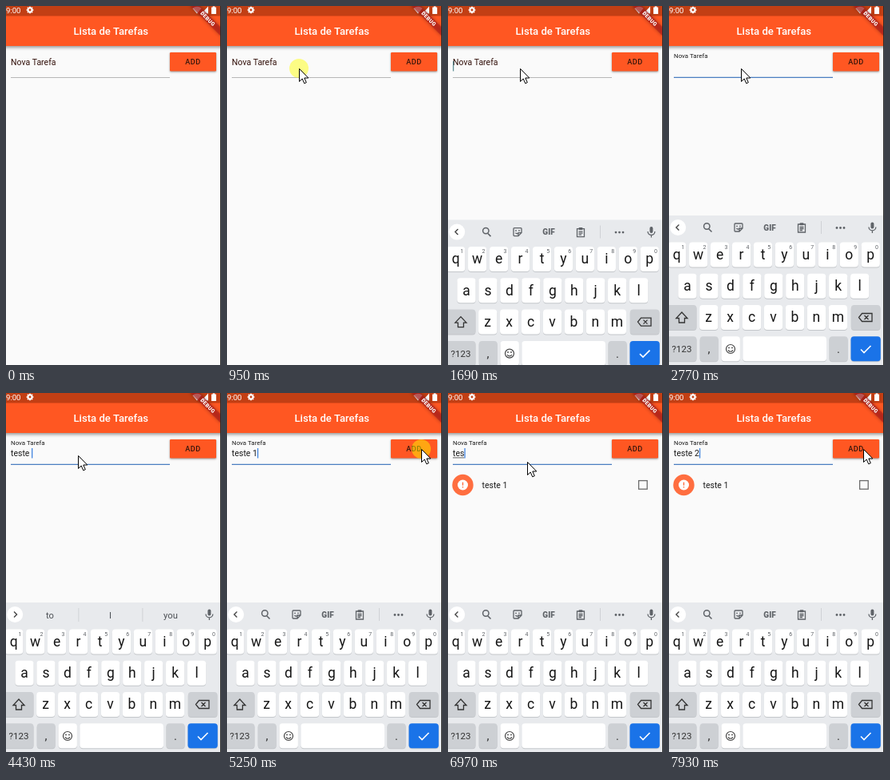
These frames come from a looping animation (269 px wide and 449 px high, 8000 ms). An HTML page with a canvas:

```html
<!DOCTYPE html>
<html lang="pt">
<head>
<meta charset="utf-8">
<title>Lista de Tarefas</title>
<style>
html, body { margin: 0; width: 100%; height: 100%; overflow: hidden; background: #fafafa; }
canvas { display: block; width: 269px; height: 449px; }
</style>
</head>
<body>
<canvas id="stage"></canvas>
<script>
const W = 269, H = 449, LOOP = 8000, STEP = 70;
const stage = document.getElementById('stage');
const ratio = window.devicePixelRatio || 1;
stage.width = W * ratio;
stage.height = H * ratio;
const c = stage.getContext('2d');

const ORANGE = '#ff5722', GREY = '#5f6368', INK = '#1c1c1c', BLUE = '#4a7dc0';

// ---------- drawing helpers ----------
function box(x, y, w, h, color, r = 0) {
  c.fillStyle = color;
  c.beginPath();
  c.roundRect(x, y, w, h, r);
  c.fill();
}
function disc(x, y, r, color) {
  c.fillStyle = color;
  c.beginPath();
  c.arc(x, y, r, 0, 7);
  c.fill();
}
function line(path, color = GREY, width = 1.3) {
  c.strokeStyle = color;
  c.lineWidth = width;
  c.stroke(new Path2D(path));
}
function shape(path, color) {
  c.fillStyle = color;
  c.fill(new Path2D(path));
}
function font(size, weight = 400) {
  c.font = `${weight} ${size}px Roboto, sans-serif`;
}
function text(str, x, y, size, color = INK, align = 'left', weight = 400, spacing = 0) {
  font(size, weight);
  c.letterSpacing = spacing + 'px';
  c.textAlign = align;
  c.fillStyle = color;
  c.fillText(str, x, y);
  c.letterSpacing = '0px';
}
function at(x, y, draw) {
  c.save();
  c.translate(x, y);
  draw();
  c.restore();
}
function withShadow(color, blur, dy, draw) {
  c.save();
  c.shadowColor = color;
  c.shadowBlur = blur * ratio;
  c.shadowOffsetY = dy * ratio;
  draw();
  c.restore();
}

// ---------- timing helpers ----------
const clamp = v => Math.max(0, Math.min(1, v));
const span = (t, from, to) => clamp((t - from) / (to - from));
const ease = p => p * p * (3 - 2 * p);
const mix = (a, b, p) => a + (b - a) * p;
const latest = (list, t) => list.filter(e => e[0] <= t).pop()[1];
const within = (t, ranges) => ranges.some(([a, b]) => t >= a && t < b);

// Motion is held for 70 ms at a time, counted from the start of each burst.
const bursts = [0, 390, 1480, 3020, 4830, 5660, 7300];
function hold(t) {
  const start = bursts.filter(b => b <= t).pop();
  return start + Math.floor((t - start) / STEP) * STEP;
}

const typed = [
  [0, ''], [3020, 't'], [3220, 'te'], [3550, 'tes'], [3620, 'test'], [4100, 'teste'],
  [4170, 'teste '], [4630, 'teste 1'], [5390, ''], [6490, 't'], [6620, 'te'],
  [6970, 'tes'], [7040, 'test'], [7300, 'teste'], [7370, 'teste '], [7580, 'teste 2']
];
const GUESS = ['teste', 'test', 'tests'], NEXT = ['to', 'I', 'you'];
const suggestions = [
  [0, null], [3280, ['te', 'the', 'to']], [3620, GUESS], [4430, NEXT], [4830, null],
  [7040, GUESS], [7510, NEXT], [7720, null]
];
const caretOff = [[0, 1480], [1970, 2370], [2770, 3020], [6220, 6420]];
const clicks = [[950, 1150], [5250, 5390]];

// ---------- app ----------
function statusBar() {
  box(0, 0, W, 12.5, '#c23f14');
  text('9:00', 0, 9, 9.6, '#fff');
  at(30, 5, () => {
    for (let i = 0; i < 4; i++) {
      c.rotate(Math.PI / 4);
      box(-1.1, -4.3, 2.2, 8.6, '#fff', 0.4);
    }
    disc(0, 0, 3.3, '#fff');
    disc(0, 0, 1.4, '#c23f14');
  });
  shape('M233.5 3Q239 -1.5 244.500 3L239 9.500Z', '#fff');
  shape('M253 0.500V9.500H244.500Z', '#fff');
  box(257, 1.5, 6, 8.5, '#fff', 0.6);
  box(258.7, 0.4, 2.6, 2, '#fff');
}

function appBar() {
  withShadow('rgba(0,0,0,.4)', 4, 1.5, () => box(-5, 0, W + 10, 50, ORANGE));
  statusBar();
  text('Lista de Tarefas', 131.3, 36, 13.1, '#fff', 'center', 500);
}

function debugBanner() {
  c.save();
  c.translate(268, 0);
  c.rotate(Math.PI / 4);
  withShadow('rgba(0,0,0,.5)', 4, 0, () => box(-27, 18.3, 54, 7.9, 'rgba(183,28,28,.63)'));
  text('DEBUG', 0.3, 24.7, 6.7, '#fff', 'center', 900, 0.3);
  c.restore();
}

function addButton(t) {
  withShadow('rgba(0,0,0,.42)', 2.5, 1, () => box(205, 58, 58, 23.6, ORANGE, 1.3));
  const ripple = span(t, 5250, 5390) * (1 - span(t, 5390, 5660));
  if (ripple) box(205, 58, 58, 23.6, `rgba(0,0,0,${0.12 * ripple})`, 1.3);
  text('ADD', 234, 73.4, 9.1, '#35150c', 'center', 500, 0.5);
}

function textField(t, q) {
  const value = latest(typed, t);
  const focus = ease(span(q, 1690, 1900));
  text('Nova Tarefa', 6, mix(73.6, 65, focus), mix(10.5, 7.9, focus), focus < 0.5 ? '#32100a' : INK);
  box(6, 89, 199, 0.8, '#a0a0a0');
  if (focus) {
    c.globalAlpha = focus;
    box(6, 88.7, 199, 1.4, BLUE);
    c.globalAlpha = 1;
  }
  text(value, 6, 78.8, 10.5);
  font(10.5);
  const end = 6 + c.measureText(value).width;
  if (/^[a-z]+$/.test(value)) box(6, 80.6, end - 6, 0.7, INK);
  if (!within(t, caretOff)) box(end, 69, 1.3, 12.5, t < 1970 ? '#5f8f95' : '#4285e0');
}

function task(name) {
  disc(18.5, 115, 13.2, '#ff6e40');
  disc(18.5, 115, 6.5, '#fff');
  box(17.8, 111.6, 1.4, 4.1, '#ff6e40');
  box(17.8, 117, 1.4, 1.4, '#ff6e40');
  text(name, 42.5, 119, 10.5);
  c.strokeStyle = '#6c6c6c';
  c.lineWidth = 1.3;
  c.strokeRect(238.6, 109.6, 10.6, 10.6);
}

// ---------- keyboard ----------
function key(x, y, w, color = '#fff') {
  box(x, y + 1, w, 31, '#c3c6ca', 4);
  box(x, y, w, 31, color, 4);
}

function letters(row, firstX, y) {
  [...row].forEach((ch, i) => {
    const x = firstX + i * 26.95;
    key(x - 11.6, y, 23.2);
    text(ch, x, y + 21.3, 17.5, '#151515', 'center');
    if (row.length === 10) text((i + 1) % 10, x + 7.8, y + 8, 7, GREY, 'center');
  });
}

function toolIcons() {
  c.strokeStyle = GREY;
  line('M50 279L53.500 282.500M51 275.500A3.700 3.700 0 1 1 43.600 275.500A3.700 3.700 0 1 1 51 275.500', GREY, 1.5);
  line('M83 272H91A1 1 0 0 1 92 273V278L88 282H83A1 1 0 0 1 82 281V273A1 1 0 0 1 83 272M92 278H88V282M84.500 278Q86 280 88 278.500');
  disc(85, 275.3, 0.9, GREY);
  disc(89, 275.3, 0.9, GREY);
  text('GIF', 126, 280.6, 10, GREY, 'center', 900);
  line('M161.500 273H170.500V283H161.500ZM163.500 276.500H168.500M163.500 278.500H168.500M163.500 280.500H167');
  box(163.5, 271.3, 5, 3, GREY, 1);
  box(190, 269, 0.8, 16, '#c8cbcf');
  for (const x of [210, 214.5, 219]) disc(x, 277.5, 1.4, GREY);
}

function suggestionBar(words) {
  disc(11.2, 277, 10, '#fff');
  line(words ? 'M10 273.500L13.500 277L10 280.500' : 'M12.500 273.500L9 277L12.500 280.500', '#444', 1.4);
  if (words) {
    words.forEach((word, i) => text(word, 55 + i * 75.5, 281.5, 11.2, '#4b4f54', 'center'));
    for (const x of [90.5, 170.5]) box(x, 269, 0.8, 17, '#c8cbcf');
  } else {
    toolIcons();
  }
  box(252.4, 270.5, 4, 8, GREY, 2);
  line('M250 276.500A4.400 4.400 0 0 0 258.800 276.500M254.400 281V284');
}

function keyboard(offset, words) {
  c.save();
  c.translate(0, offset);
  box(0, 262, W, 190, '#e8eaed');
  suggestionBar(words);
  letters('qwertyuiop', 9.7, 295.5);
  letters('asdfghjkl', 23, 334.7);
  letters('zxcvbnm', 49.7, 374);

  const dark = '#cdd0d4';
  key(-4, 374, 38.5, dark);
  line('M16 383L23 390.500H19.500V396H12.500V390.500H9Z', '#333', 1.3);
  key(227.8, 374, 36.7, dark);
  line('M241.500 384.500H254V394.500H241.500L237.500 389.500ZM244.500 387L249.500 392M249.500 387L244.500 392', '#333', 1.3);

  key(-4, 413.3, 38.5, dark);
  text('?123', 16, 433, 11.5, '#333', 'center');
  key(38.7, 413.3, 23, dark);
  text(',', 50, 434, 15, '#333', 'center');
  key(65.5, 413.3, 23.4);
  line('M82.500 429A5.500 5.500 0 1 1 71.500 429A5.500 5.500 0 1 1 82.500 429M74 430.500Q77 434 80 430.500', '#444', 1.2);
  disc(75, 427.4, 0.9, '#444');
  disc(79, 427.4, 0.9, '#444');
  key(92.3, 413.3, 104.7);
  key(200.5, 413.3, 23.2, dark);
  text('.', 212, 434, 15, '#333', 'center');
  key(227.5, 413.3, 37.3, '#1a73e8');
  line('M240 429.500L244 433.500L252.500 425', '#fff', 1.6);
  c.restore();
}

// ---------- pointer ----------
const FIELD = [90, 78], BUTTON = [243, 70], REST = [99, 86];
const glide = (a, b, p) => [mix(a[0], b[0], p), mix(a[1], b[1], p)];

function pointerAt(t) {
  if (t < 950) {
    const p = ease(span(t, 320, 910)), n = 1 - p;
    const bend = (a, b, d) => n * n * a + 2 * n * p * b + p * p * d;
    return [bend(142, 10, FIELD[0]), bend(312, 120, FIELD[1])];
  }
  if (t < 5600) return glide(FIELD, BUTTON, ease(span(t, 4830, 5180)));
  if (t < 7300) return glide(BUTTON, REST, ease(span(t, 5590, 5870)));
  return glide(REST, BUTTON, ease(span(t, 7580, 7930)));
}

function pointer(t, q) {
  if (t < 390) return;
  const [x, y] = pointerAt(q);
  if (within(t, clicks)) disc(x, y, 12, 'rgba(255,255,0,.47)');
  at(x, y, () => {
    const arrow = 'M0.500 0.500V16.500L4.200 13L6.700 18.800L9.300 17.700L6.800 12H11.800Z';
    shape(arrow, '#fff');
    line(arrow, '#000', 1);
  });
}

function draw(t) {
  const q = hold(t);
  c.setTransform(ratio, 0, 0, ratio, 0, 0);
  box(0, 0, W, H, '#fafafa');
  appBar();
  debugBanner();
  textField(t, q);
  addButton(q);
  if (t >= 5390) task('teste 1');
  if (t >= 1480) keyboard(187 * Math.exp((1476 - q) / 61), latest(suggestions, t));
  box(268, 0, 1, H, '#2b2b2b');
  pointer(t, q);
}

function tick() {
  draw(performance.now() % LOOP);
  requestAnimationFrame(tick);
}
tick();
</script>
</body>
</html>
```
